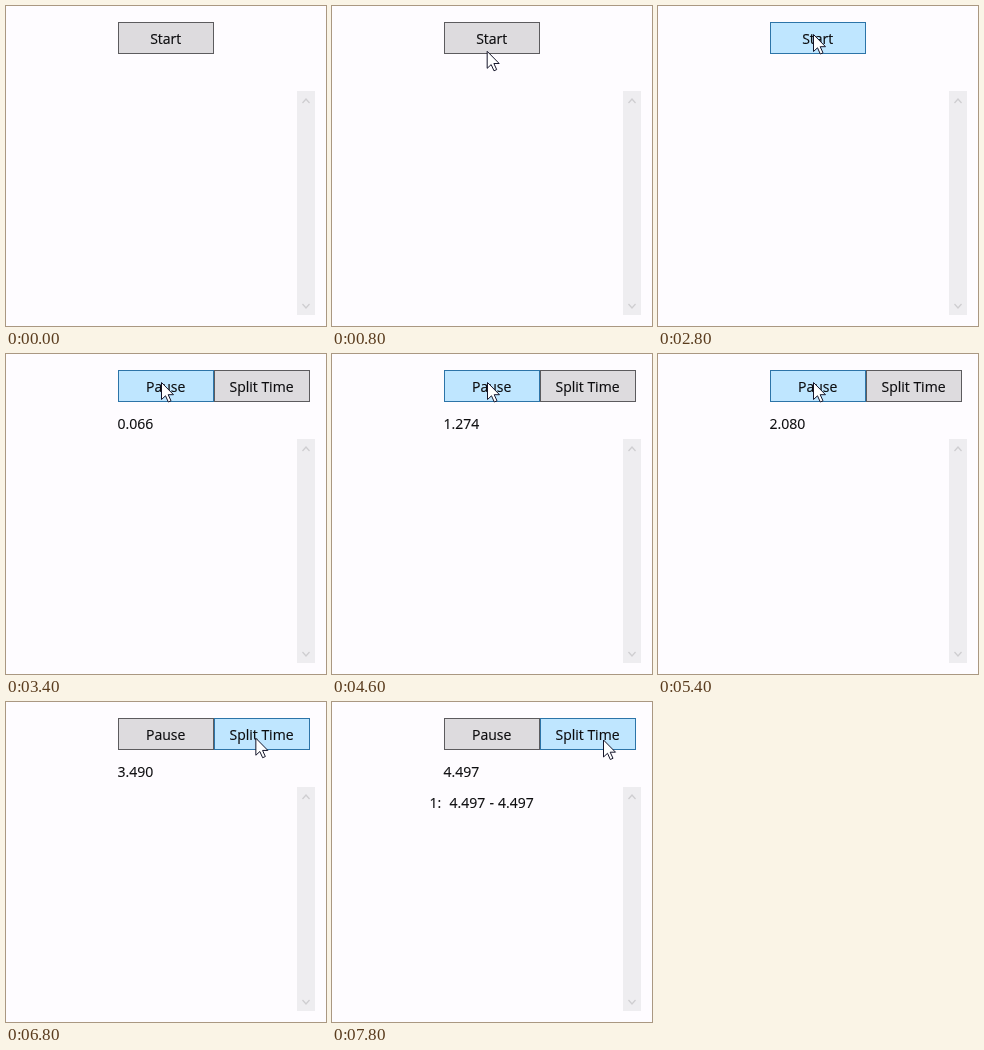
An HTML page for the animation above (8 s loop, 320 by 320 pixels).

```html
<!DOCTYPE html>
<html lang="en">
<head>
<meta charset="utf-8">
<title>Stopwatch</title>
<style>
  html, body { margin: 0; width: 100%; height: 100%; overflow: hidden; background: #fefcff; }
  svg { display: block; width: 100%; height: 100%; }
  text { font: 14px "Open Sans", "Noto Sans", sans-serif; fill: #0c0c0e; stroke: #0c0c0e; stroke-width: .15; white-space: pre; }
  .label { text-anchor: middle; }
  .button rect { fill: #dddbde; stroke: #5c5b5e; }
  .button.hover rect { fill: #bfe6ff; stroke: #2c74a8; }
  .button.pressed rect { fill: #c4e5f6; stroke: #2c628b; }
  #split-row { word-spacing: .5px; }
</style>
</head>
<body>
<svg viewBox="0 0 320 320">
  <g id="main" class="button">
    <rect x="112.5" y="16.5" width="95" height="31"/>
    <text class="label" id="main-label" x="159.7" y="38">Start</text>
  </g>
  <g id="split" class="button">
    <rect x="208.5" y="16.5" width="95" height="31"/>
    <text class="label" x="255.5" y="38">Split Time</text>
  </g>
  <text id="timer" x="111.5" y="75"></text>
  <text id="split-row" x="97.5" y="106"></text>
  <rect x="291" y="85" width="18" height="224" fill="#eeedf0"/>
  <path d="M296.5 97l3.5-4 3.5 4M296.5 298l3.5 4 3.5-4" fill="none" stroke="#cfced1" stroke-width="1.3"/>
  <path id="cursor" d="M0 0V17L4 13.3 6.8 19.5 9.5 18.3 6.7 12.2H12Z" fill="#fff" stroke="#15152a"/>
</svg>
<script>
  const LOOP = 8000, STEP = 200;
  const ENTER = 200, WANDER = 1200, REST = 2800, LEAVE = 6200, ARRIVE = 7600;
  const CLICK_START = 3400, CLICK_SPLIT = 7800;

  const el = id => document.getElementById(id);
  const main = el("main"), split = el("split"), cursor = el("cursor");

  const progress = (t, start, end) => Math.min(1, Math.max(0, (t - start) / (end - start)));
  const mix = (a, b, k) => a + (b - a) * k;
  const easeOut = (k, power) => 1 - (1 - k) ** power;

  function cursorAt(t) {
    if (t < WANDER) {
      const k = easeOut(progress(t, ENTER, WANDER), 2);
      return [mix(111, 163, k), mix(133, 28, k)];
    }
    if (t < LEAVE) {
      const k = progress(t, WANDER, REST);
      return [155 + 8 * Math.cos(1.5 * Math.PI * k), 28 - 4 * Math.sin(2 * Math.PI * k)];
    }
    const k = easeOut(progress(t, LEAVE, ARRIVE), 3);
    return [mix(155, 271, k), mix(28, 37.5, k)];
  }

  function draw(t) {
    const running = t >= CLICK_START;
    const [x, y] = cursorAt(t);
    const overSplit = running && x > 208;
    const overMain = t >= REST && !overSplit;
    const time = running ? mix(0.066, 4.497, progress(t, CLICK_START, CLICK_SPLIT)).toFixed(3) : "";

    main.classList.toggle("hover", overMain);
    main.classList.toggle("pressed", t === CLICK_START - STEP);
    split.classList.toggle("hover", overSplit);
    split.style.display = running ? "" : "none";
    el("main-label").textContent = running ? "Pause" : "Start";
    el("timer").textContent = time;
    el("split-row").textContent = t >= CLICK_SPLIT ? `1:  ${time} - ${time}` : "";
    cursor.style.display = t >= ENTER ? "" : "none";
    cursor.setAttribute("transform", `translate(${x + .5} ${y + .5})`);
  }

  function frame() {
    const t = performance.now() % LOOP;
    draw(Math.floor(t / STEP) * STEP);
    requestAnimationFrame(frame);
  }
  frame();
</script>
</body>
</html>
```
